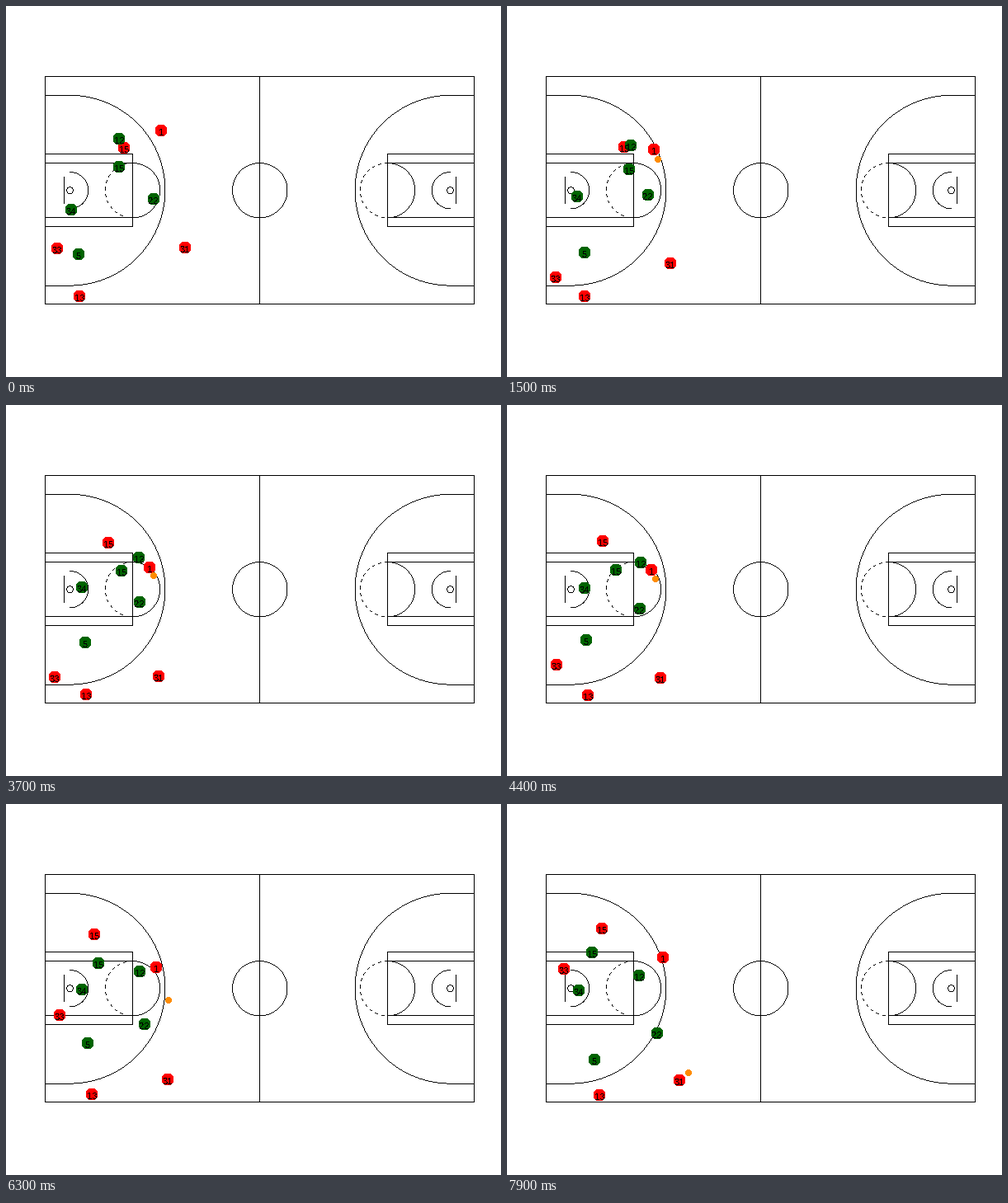
A matplotlib script that plays this animation: 600 by 450 pixels, repeating every 8 s.

```python
import numpy as np
import matplotlib.pyplot as plt
from matplotlib.animation import FuncAnimation
from matplotlib.collections import PolyCollection
from matplotlib.patches import Rectangle, RegularPolygon

FRAMES, STEP = 80, 100
PX = 0.72  # one pixel in points at 100 dpi
RED, GREEN, ORANGE = "#ff0000", "#006400", "#ff8c00"
PASS_AT = 57

# Each run: start, total drift, bow (half sine wave) and sway (full sine wave)
ATTACK = {
    "15": [(143, 172), (-28, -21), (-8, 5), (9, 0)],
    "1": [(188, 151), (1, 35), (-14, 30), (-2, -1)],
    "33": [(62, 294), (7, -94), (-6, 78), (-1, 10)],
    "13": [(89, 352), (23, 1), (-3, -1), (2, 0)],
    "31": [(217, 293), (-8, 42), (-28, 16), (-2, 2)],
}
DEFENCE = {
    "12": [(137, 161), (23, 47), (13, 3), (1, -3)],
    "15": [(137, 195), (-34, -15), (17, 13), (8, -2)],
    "22": [(179, 234), (3, 44), (-19, -14), (2, -6)],
    "34": [(79, 247), (8, -21), (10, -15), (-1, -4)],
    "5": [(88, 301), (18, 9), (-1, -19), (3, 7)],
}

fig = plt.figure(figsize=(6, 4.5), dpi=100, facecolor="white")
ax = fig.add_axes([0, 0, 1, 1])
ax.set_xlim(0, 600)
ax.set_ylim(450, 0)
ax.axis("off")

CX, CY = 307.3, 223.2


def line(x0, y0, x1, y1):
    ax.plot([x0, x1], [y0, y1], color="black", lw=PX, aa=False, zorder=1)


def box(x0, y0, x1, y1):
    ax.add_patch(Rectangle((x0, y0), x1 - x0, y1 - y0, fill=False,
                           lw=PX, ec="black", aa=False, zorder=1))


def ring(cx, r, side=0, dashed=False):
    """Circle one pixel thick, or only its left (-1) or right (1) half."""
    reach = np.ceil(r * np.sqrt(0.5))
    k = np.arange(-reach, reach + 1)
    h = np.sqrt(r * r - k * k)
    dx = np.concatenate([k, k, h, -h])
    dy = np.concatenate([h, -h, k, k])
    keep = dx * side >= 0
    if dashed:
        keep &= np.arctan2(dy, dx) * r % 8 < 4
    corners = np.round(np.column_stack([cx + dx, CY + dy]))[keep]
    unit = np.array([(0, 0), (1, 0), (1, 1), (0, 1)])
    ax.add_collection(PolyCollection(corners[:, None] + unit, facecolors="black",
                                     linewidths=0, antialiaseds=False, zorder=1),
                      autolim=False)


def half_court(edge, hoop, foul, board, side):
    for y in (108, 339):
        line(edge, y, hoop, y)
    box(edge, 179, foul, 267)
    for y in (190, 256):
        line(edge, y, foul, y)
    for r in (115.4, 22.2):
        ring(hoop, r, side)
    ring(hoop, 4)
    line(board, 207, board, 239)
    ring(foul, 33.2, 1)
    ring(foul, 33.2, -1, dashed=True)


box(47, 85, 567, 361)
line(307, 85, 307, 361)
ring(CX, 33.2)
half_court(47, 77, 153, 70, 1)
half_court(567, 538, 462, 545, -1)


def dot(r, color, z):
    return ax.add_patch(RegularPolygon((0, 0), 8, radius=r, orientation=np.pi / 8,
                                       fc=color, lw=0, aa=False, zorder=z))


def run(start, drift, bow, sway):
    u = np.linspace(0, 1, FRAMES)[:, None]
    return np.round(start + u * drift + np.sin(np.pi * u) * bow
                    + np.sin(2 * np.pi * u) * sway)


def ball_run(carrier):
    """Dribble beside the carrier, then a straight pass."""
    t = np.arange(FRAMES)[:, None]
    bounce = 6.5 + 5.5 * np.cos(2 * np.pi * (t - 15) / 26)
    dribble = carrier + np.hstack([np.full_like(bounce, 5), bounce])
    u = (t - PASS_AT) / (FRAMES - 1 - PASS_AT)
    throw = (1 - u) * np.array([188, 205]) + u * np.array([220, 326])
    return np.round(np.where(t < PASS_AT, dribble, throw))


players = []
for team, color in ((ATTACK, RED), (DEFENCE, GREEN)):
    for number, parts in team.items():
        label = ax.text(0, 0, number, color="black", fontsize=8, family="Liberation Sans",
                        ha="center", va="center_baseline", antialiased=False, zorder=3)
        players.append((dot(7.3, color, 2), label, run(*np.array(parts))))

ball = dot(3.5, ORANGE, 4)
ball_path = ball_run(run(*np.array(ATTACK["1"])))


def update(n):
    for disc, label, route in players:
        x, y = route[n]
        disc.xy = x, y
        label.set_position((x, y + 2))
    ball.xy = ball_path[n]
    ball.set_visible(n > 0)
    return []


anim = FuncAnimation(fig, update, frames=FRAMES, interval=STEP, repeat=True, repeat_delay=0)
plt.show()
```
